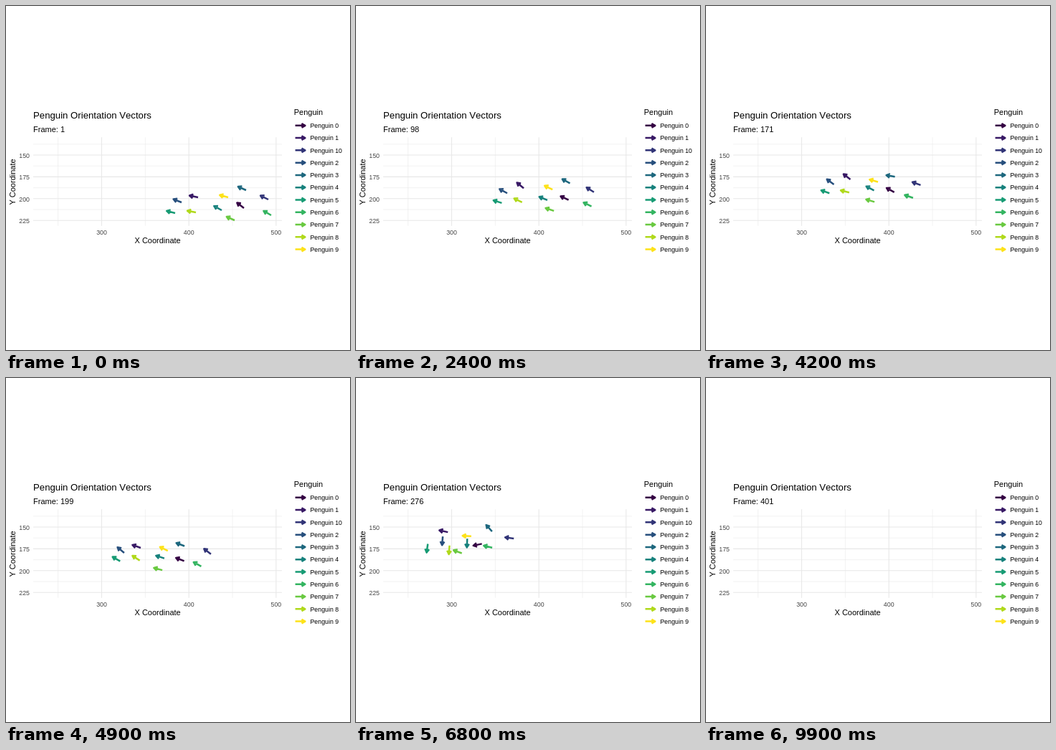
An HTML page for the animation above (10000 ms loop, 480 by 480 pixels).

```html
<!DOCTYPE html>
<html lang="en">
<head>
<meta charset="utf-8">
<title>Penguin Orientation Vectors</title>
<style>
  html, body { margin: 0; width: 100%; height: 100%; overflow: hidden; background: #fff; }
  svg { display: block; width: 480px; height: 480px; font-family: "Liberation Sans", Arial, sans-serif; font-kerning: none; }
  .grid { stroke: #e7e7e7; }
  .tick { font-size: 8.8px; fill: #444; }
  .label { font-size: 8.8px; }
  .sub { font-size: 11px; }
  .title { font-size: 13.2px; }
  .arrow { fill: none; stroke-width: 2.5; stroke-linejoin: round; }
</style>
</head>
<body>
<svg viewBox="0 0 480 480"></svg>
<script>
const svg = document.querySelector('svg');

// Each penguin walks from start past mid to end, where it turns to face a final angle
const penguin = (name, color, start, mid, end, face) => ({ name, color, start, mid, end, face });
const flock = [
  penguin(0, '#340043', [332, 282], [232, 250], [129, 216], 139),
  penguin(1, '#381965', [268, 267], [172, 231], [92, 202], 180),
  penguin(10, '#313477', [366, 270], [270, 241], [179, 210], 180),
  penguin(2, '#274f7d', [245, 274], [149, 238], [98, 207], 0),
  penguin(3, '#1d677e', [335, 257], [232, 230], [155, 201], 241),
  penguin(4, '#16817c', [301, 285], [205, 245], [114, 207], 9),
  penguin(5, '#179b74', [236, 289], [144, 249], [64, 217], 0),
  penguin(6, '#33b460', [370, 292], [253, 257], [138, 220], 176),
  penguin(7, '#69c940', [319, 299], [198, 262], [106, 230], 194),
  penguin(8, '#b0d91b', [265, 288], [171, 248], [97, 222], 0),
  penguin(9, '#fde219', [310, 267], [209, 236], [121, 208], 170)
];
const midStep = 57, endStep = 79, lastStep = 99;
const westward = 205; // walking direction, degrees clockwise from east

function add(tag, attrs, text = '') {
  const el = document.createElementNS('http://www.w3.org/2000/svg', tag);
  for (const k in attrs) el.setAttribute(k, attrs[k]);
  el.textContent = text;
  return svg.appendChild(el);
}
const write = (cls, x, y, text, anchor = 'start') =>
  add('text', { class: cls, x, y, 'text-anchor': anchor }, text);
const grid = (d, width) => add('path', { class: 'grid', d, 'stroke-width': width });
const arrow = (length, color) => add('path', {
  class: 'arrow', stroke: color,
  d: `M0 0H${length}m-4.9-2.83l4.9 2.83l-4.9 2.83`
});

for (let i = 0; i < 3; i++) {
  const x = 133.5 + i * 121.7;
  grid(`M${x - 60.85} 183.2V306.8`, .53);
  grid(`M${x} 183.2V306.8`, 1.07);
  write('tick', x, 319, 300 + i * 100, 'middle');
}
for (let i = 0; i < 4; i++) {
  const y = 208 + i * 30.4;
  grid(`M38 ${y - 15.2}H385`, .53);
  grid(`M38 ${y}H385`, 1.07);
  write('tick', 33, y + 3.7, 150 + i * 25, 'end');
}
write('title', 38, 157, 'Penguin Orientation Vectors');
const counter = write('sub', 38, 176, '');
write('sub', 211.6, 331, 'X Coordinate', 'middle');
write('sub', 0, 0, 'Y Coordinate', 'middle').setAttribute('transform', 'translate(13 245.5) rotate(-90)');
write('sub', 401.7, 152, 'Penguin');

flock.forEach((p, i) => {
  const y = 166.8 + i * 17.28;
  arrow(13.8, p.color).setAttribute('transform', `translate(403.6 ${y})`);
  write('label', 424.5, y + 3.2, 'Penguin ' + p.name);
  p.el = arrow(12.2, p.color);
});

const mix = (a, b, u) => a + (b - a) * u;
const clamp = u => Math.max(0, Math.min(1, u));
const noise = n => (Math.abs(Math.sin(n * 12.9898) * 43758.5453) % 1) * 2 - 1;

function draw(time) {
  const step = Math.floor(time % 10000 / 100);
  const walk = clamp(step / midStep) ** 1.2;
  const settle = clamp((step - midStep) / (endStep - midStep)) ** .87;

  counter.textContent = 'Frame: ' + Math.round(1 + step * 400 / lastStep);
  flock.forEach((p, i) => {
    const [x, y] = p.start.map((s, axis) => mix(mix(s, p.mid[axis], walk), p.end[axis], settle));
    const sway = 15 * (1 - settle) * noise(step * flock.length + i + 1);
    const turn = mix(westward, p.face, settle) + sway;
    p.el.setAttribute('transform', `translate(${x} ${y}) rotate(${turn})`);
    p.el.setAttribute('visibility', step < lastStep ? 'visible' : 'hidden');
  });
}

const began = performance.now();
function loop() {
  draw(performance.now() - began);
  requestAnimationFrame(loop);
}
loop();
</script>
</body>
</html>
```
